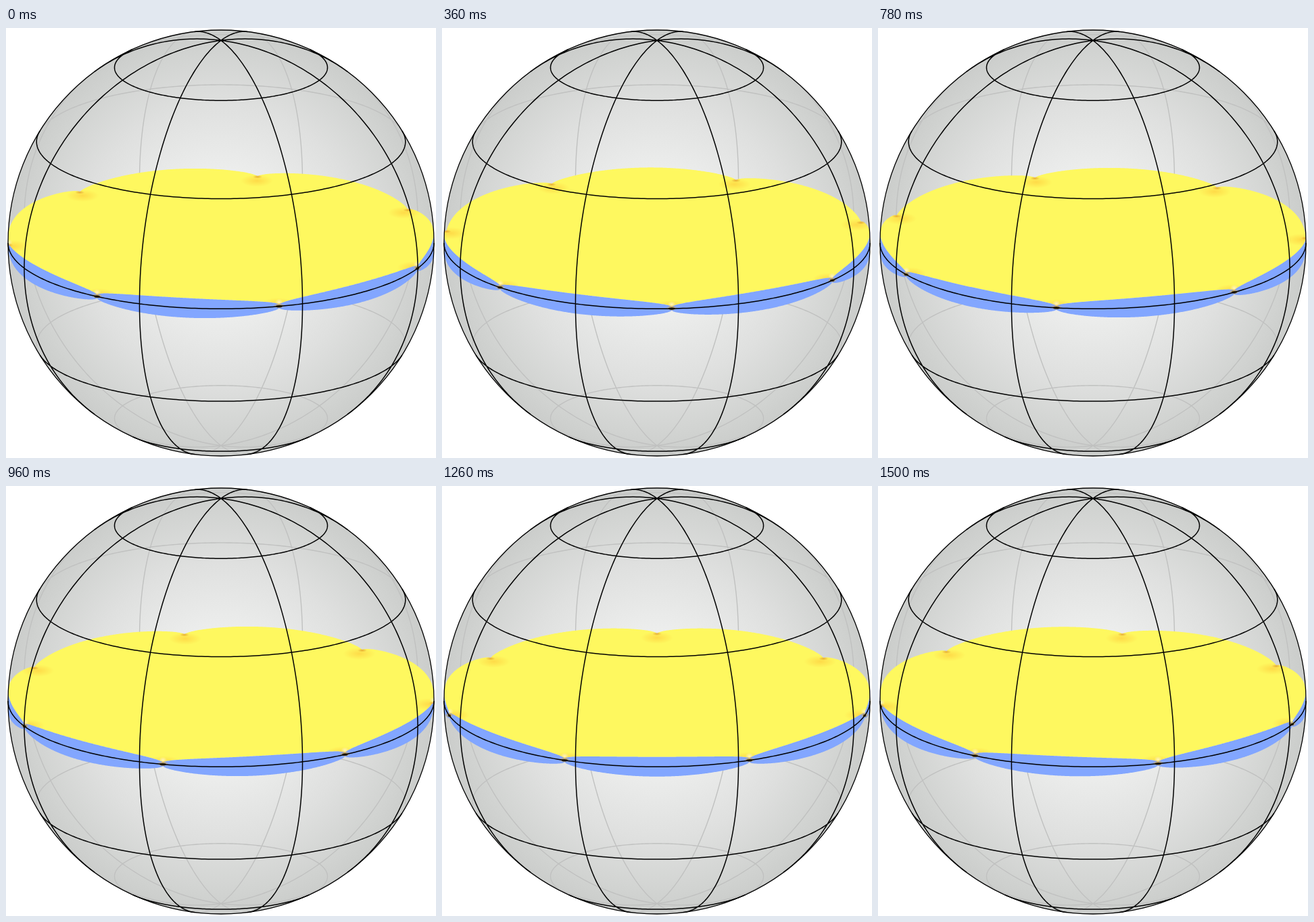
Animation, 636 px wide and 636 px high, one loop 1560 ms. Source, as an HTML page with a canvas:

```html
<!DOCTYPE html>
<html lang="en">
<head>
<meta charset="utf-8">
<title>Rotating wave in a sphere</title>
<style>
  html, body { margin: 0; width: 100%; height: 100%; overflow: hidden; background: #fff; }
  canvas { display: block; }
</style>
</head>
<body>
<canvas id="stage" width="636" height="636"></canvas>
<script>
const ctx = document.getElementById('stage').getContext('2d');
const C = 318, R = 315, TAU = 2 * Math.PI, DEG = Math.PI / 180;
const SIN = Math.sin(18 * DEG), COS = Math.cos(18 * DEG);
const LOBES = 7, STEPS = 26, STEP_MS = 60;
const SECTOR = TAU / LOBES;

// Orthographic view of a point on the sphere; z > 0 faces the viewer.
function project(lat, lon) {
  const c = Math.cos(lat), s = Math.sin(lat), d = c * Math.cos(lon);
  return {
    x: C + R * c * Math.sin(lon),
    y: C - R * (s * COS - d * SIN),
    z: s * SIN + d * COS
  };
}

function curve(fn, from, to, n) {
  return Array.from({ length: n + 1 }, (_, i) => fn(from + (to - from) * i / n));
}

function polygon(points) {
  const path = new Path2D();
  points.forEach(p => path.lineTo(p.x, p.y));
  path.closePath();
  return path;
}

// Split the graticule into its near and far halves.
const near = new Path2D(), far = new Path2D();
function addLine(points) {
  for (let i = 1; i < points.length; i++) {
    const a = points[i - 1], b = points[i];
    const path = a.z + b.z > 0 ? near : far;
    if (i === 1 || (points[i - 2].z + a.z > 0) !== (a.z + b.z > 0)) path.moveTo(a.x, a.y);
    path.lineTo(b.x, b.y);
  }
}
for (let lat = -60; lat <= 60; lat += 30) {
  addLine(curve(lon => project(lat * DEG, lon), 0, TAU, 360));
}
for (let lon = 22.5; lon < 360; lon += 45) {
  addLine(curve(lat => project(lat, lon * DEG), -Math.PI / 2, Math.PI / 2, 180));
}

const ball = new Path2D();
ball.arc(C, C, R, 0, TAU);

const shade = ctx.createRadialGradient(C, C, 0, C, C, R);
[[0, '#f4f5f4'], [0.35, '#ecedec'], [0.65, '#dfe0df'], [0.9, '#d1d3d1'], [1, '#cbcdcb']]
  .forEach(([at, color]) => shade.addColorStop(at, color));

function strokeLines(path, color, width) {
  ctx.strokeStyle = color;
  ctx.lineWidth = width;
  ctx.stroke(path);
}

function glow(x, y, rx, ry, rgb, alpha) {
  ctx.save();
  ctx.translate(x, y);
  ctx.scale(rx, ry);
  const g = ctx.createRadialGradient(0, 0, 0, 0, 0, 1);
  g.addColorStop(0, `rgba(${rgb},${alpha})`);
  g.addColorStop(1, `rgba(${rgb},0)`);
  ctx.fillStyle = g;
  ctx.fillRect(-1, -1, 2, 2);
  ctx.restore();
}

function drawSurface(turn) {
  const rim = lon => 0.007 + 0.0415 * Math.sqrt(Math.abs(Math.sin((lon - turn) * LOBES / 2)));
  const upper = lon => project(rim(lon), lon);
  const lower = lon => project(-rim(lon), lon);
  const top = polygon(curve(upper, 0, TAU, 1440));
  const q = Math.PI / 2;
  const side = polygon([...curve(upper, -q, q, 720), ...curve(lower, q, -q, 720)]);
  const nodes = Array.from({ length: LOBES }, (_, i) => project(0, turn + i * SECTOR));

  ctx.fillStyle = '#fef85f';
  ctx.fill(top);
  ctx.save();
  ctx.clip(top);
  for (const { x, y, z } of nodes) {
    const inward = (C - x) * 0.02;
    glow(x + inward, y - z * 4, 24, 9, '255,190,50', 0.5);
    if (z > 0) glow(x, y - 6, 6, 5, '255,246,205', 0.9);
  }
  ctx.restore();

  ctx.fillStyle = '#82a6ff';
  ctx.fill(side);

  for (const { x, y, z } of nodes) {
    if (z < 0.05) {
      glow(x, y - 2, 7, 2.5, '215,130,30', 0.6);
      continue;
    }
    const w = 1.5 + 3.5 * z;
    glow(x, y - 1, w + 4, 4, '225,165,30', 0.9);
    ctx.fillStyle = '#4a3a10';
    ctx.beginPath();
    ctx.ellipse(x, y, w, 1.8, 0, 0, TAU);
    ctx.fill();
  }
}

function draw(now) {
  const step = Math.floor(now / STEP_MS) % STEPS;
  const turn = SECTOR * (8 / STEPS - step / STEPS);

  ctx.fillStyle = '#fff';
  ctx.fillRect(0, 0, 636, 636);
  ctx.fillStyle = shade;
  ctx.fill(ball);
  strokeLines(far, '#c0c1c0', 1.4);

  ctx.save();
  ctx.clip(ball);
  drawSurface(turn);
  ctx.restore();

  strokeLines(near, '#000', 1.5);
  strokeLines(ball, '#000', 1.3);
}

function tick() {
  draw(performance.now());
  requestAnimationFrame(tick);
}
tick();
</script>
</body>
</html>
```
